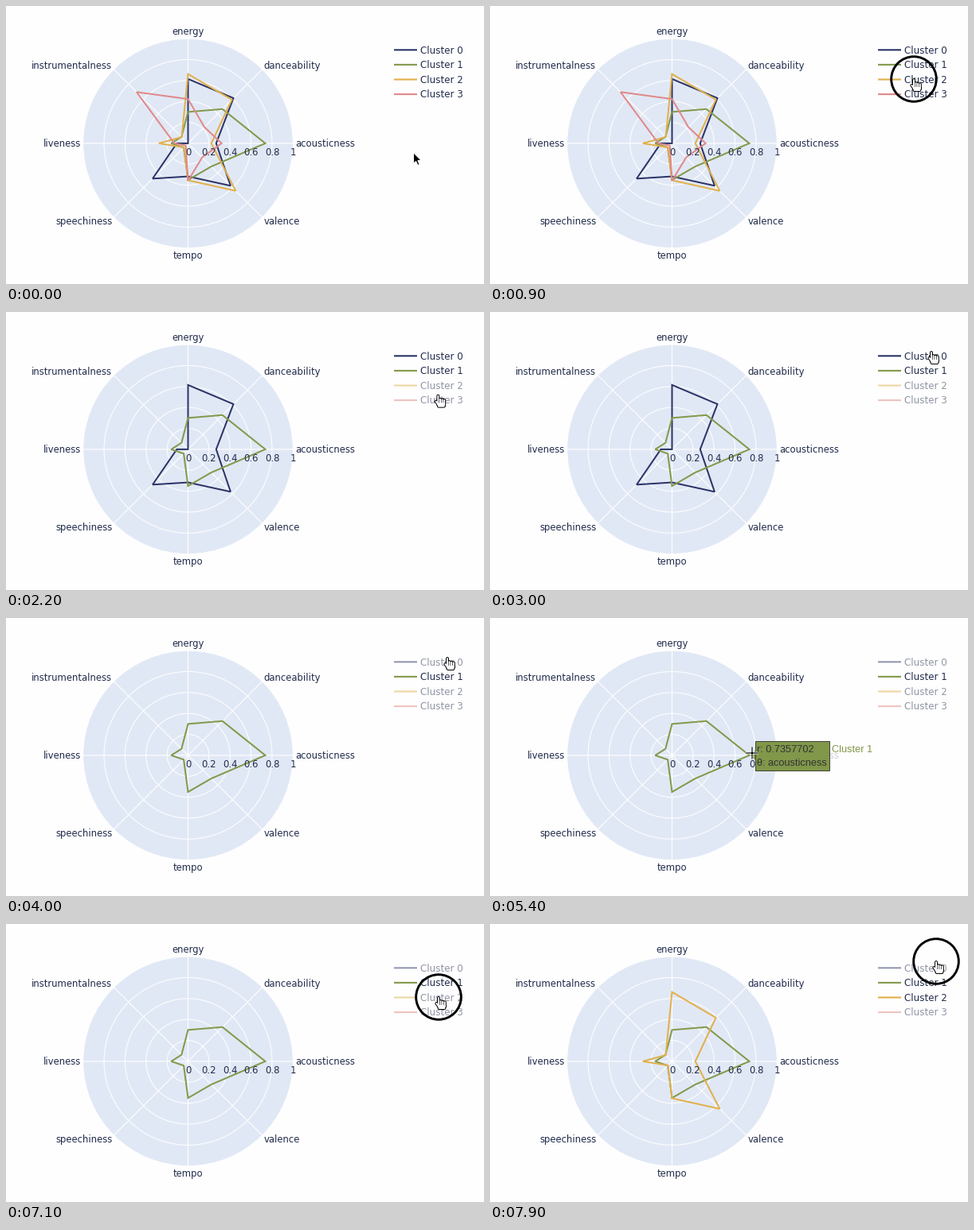
A matplotlib script for the animation above (8000 ms loop, 600x350 px).

```python
import numpy as np
import matplotlib.pyplot as plt
from matplotlib.animation import FuncAnimation
from matplotlib.patches import Circle, Polygon, Rectangle

W, H, DPI = 600, 350, 100
STEP, FRAMES = 100, 80
PX = 72 / DPI
CX, CY, R = 228.5, 172.9, 131.8
INK, PAPER, GREEN = "#212c4c", "#fefefe", "#81974a"

plt.rcParams["font.family"] = "DejaVu Sans"
fig = plt.figure(figsize=(W / DPI, H / DPI), dpi=DPI, facecolor=PAPER)
ax = fig.add_axes([0, 0, 1, 1])
ax.set(xlim=(0, W), ylim=(H, 0))
ax.axis("off")


def label(x, y, text, ha="left", size=11.6, color=INK, z=4, **kw):
    return ax.text(x, y + 4.2, text, ha=ha, va="baseline", color=color,
                   fontsize=size * PX, zorder=z, **kw)


def stroke(x, y, color, width, z, cap="butt"):
    return ax.plot(x, y, color=color, lw=width * PX, zorder=z, snap=False,
                   solid_capstyle=cap, solid_joinstyle="round")[0]


def polar(r, angle):
    return CX + r * np.cos(angle), CY - r * np.sin(angle)


# Polar grid
ANGLES = np.arange(8) * np.pi / 4
FEATURES = ["acousticness", "danceability", "energy", "instrumentalness",
            "liveness", "speechiness", "tempo", "valence"]
ax.add_patch(Circle((CX, CY), R, fc="#e1e8f5", ec="none", zorder=1))
for k in range(6):
    ax.add_patch(Circle((CX, CY), R * k / 5, fc="none", ec="white", lw=PX, zorder=1))
    label(CX + R * k / 5, 184, f"{k / 5:g}", "center")
for angle, feature in zip(ANGLES, FEATURES):
    c, s = np.cos(angle), np.sin(angle)
    stroke(*zip((CX, CY), polar(R, angle)), "white", 1.1, 1)
    side = "center" if abs(c) < .1 else "left" if c > 0 else "right"
    label(CX + (R + 3) * c, CY - (R + 5 + 4.5 * s * s) * s, feature, side)

# Mean of each feature, in the order of FEATURES
CLUSTERS = [
    ("#2b3467", [.268, .611, .615, 0, .107, .477, .316, .573]),
    ("#83994a", [.736, .463, .30, .088, .16, .058, .35, .313]),
    ("#e1b04b", [.222, .59, .662, .085, .278, .055, .353, .642]),
    ("#e08989", [.32, .22, .423, .693, .13, .03, .357, .19]),
]
traces, keys = [], []
for i, (color, means) in enumerate(CLUSTERS):
    points = np.column_stack(polar(R * np.array(means), ANGLES))
    traces.append(ax.add_patch(Polygon(points, fc="none", ec=color, lw=2 * PX,
                                       joinstyle="miter", zorder=2)))
    y = 55.3 + 18.6 * i
    keys.append((stroke([487, 516], [y, y], color, 2.1, 3),
                 label(520.5, y, f"Cluster {i}", size=11.9)))

# Hover label of the acousticness point of cluster 1
HOT = np.array(polar(R * CLUSTERS[1][1][0], 0))
HOVER = dict(size=12.8, family="Liberation Sans", z=7)
hover = [
    ax.add_patch(Rectangle((426, 156), 57, 25, fc=PAPER, alpha=.8, zorder=5)),
    ax.add_patch(Rectangle((332.5, 154.5), 93.5, 37, fc=GREEN, ec="#3f4433",
                           lw=PX, zorder=6)),
    ax.add_patch(Polygon([HOT + (1, 0), HOT + (7.5, -6), HOT + (7.5, 6)],
                         fc=GREEN, zorder=6)),
    label(335, 165, "r: 0.7357702", color="#333333", **HOVER),
    label(335, 182, "θ: acousticness", color="#333333", **HOVER),
    label(429, 165, "Cluster 1", color=GREEN, **HOVER),
]


# Pointers, drawn relative to their hot spot
def polyline(*strokes):
    """Join separate strokes into one array with gaps between them."""
    return np.vstack([row for s in strokes for row in (*s, (np.nan, np.nan))])


ARROW = np.array([(0, 0), (0, 14), (3.2, 11.2), (5.4, 16.2), (7.8, 15.2),
                  (5.6, 10.2), (9.9, 10)]) - (.6, .6)
fingers = [[(2.6 * k, 4.5 + .6 * k if k else 1), (2.6 * k, 12)] for k in range(4)]
palm = [[(.6, y), (7.4, y)] for y in (11, 12.5, 14)]
HAND = polyline(*fingers, *palm, [(-2.6, 8), (0, 11.5)])
CROSS = polyline([(-7.5, 0), (7.5, 0)], [(0, -7.5), (0, 7.5)])

arrow = ax.add_patch(Polygon(ARROW, fc="black", ec="white", lw=1.2 * PX, zorder=9))
hand = [stroke([], [], *style, "round") for style in [("black", 4, 9), ("white", 2, 10)]]
cross = [stroke([], [], *style) for style in [("white", 3, 9), ("black", 1.2, 10)]]
ring = ax.add_patch(Circle((0, 0), 28.3, fc="none", ec="black", lw=2.9 * PX, zorder=11))

# Pointer moves: start, end, destination
HOME = (512, 185)
MOVES = [
    (0, 900, (532, 92)), (1200, 1700, (541, 111)), (2100, 2600, (554, 50)),
    (4700, 5400, (329, 170)), (5800, 6200, (540, 146)), (6200, 6700, (543, 92)),
    (7200, 7600, (560, 47)),
]
# Clicks: press, moment the trace toggles, cluster
CLICKS = [(900, 1300, 2), (1900, 2200, 3), (3400, 3900, 0), (7100, 7400, 2),
          (7800, 8200, 0)]


def pointer_at(t):
    pos = np.array(HOME, float)
    for start, end, goal in MOVES:
        u = np.clip((t - start) / (end - start), 0, 1)
        pos += (np.array(goal) - pos) * u * u * (3 - 2 * u)
    return pos


def pointer_kind(x, y):
    if 487 < x < 580 and 45 < y < 122:
        return "hand"
    return "cross" if np.hypot(x - CX, y - CY) < R else "arrow"


def draw(n):
    t = n * STEP
    for i, (trace, key) in enumerate(zip(traces, keys)):
        toggles = sum(i == cluster and t >= when for _, when, cluster in CLICKS)
        on = toggles % 2 == 0
        trace.set_visible(on)
        for part in key:
            part.set_alpha(1 if on else .5)

    pos = pointer_at(t)
    for part in hover:
        part.set_visible(np.hypot(*(pos - HOT)) < 20)

    kind = pointer_kind(*pos)
    arrow.set_xy(ARROW + pos)
    arrow.set_visible(kind == "arrow")
    for name, parts, shape in [("hand", hand, HAND), ("cross", cross, CROSS)]:
        for part in parts:
            part.set_data(*(shape + pos).T)
            part.set_visible(kind == name)

    ring.center = pos
    ring.set_visible(any(press <= t < press + 2 * STEP for press, *_ in CLICKS))
    return []


anim = FuncAnimation(fig, draw, frames=FRAMES, interval=STEP, repeat=True,
                     repeat_delay=0, init_func=lambda: draw(0))
plt.show()
```
